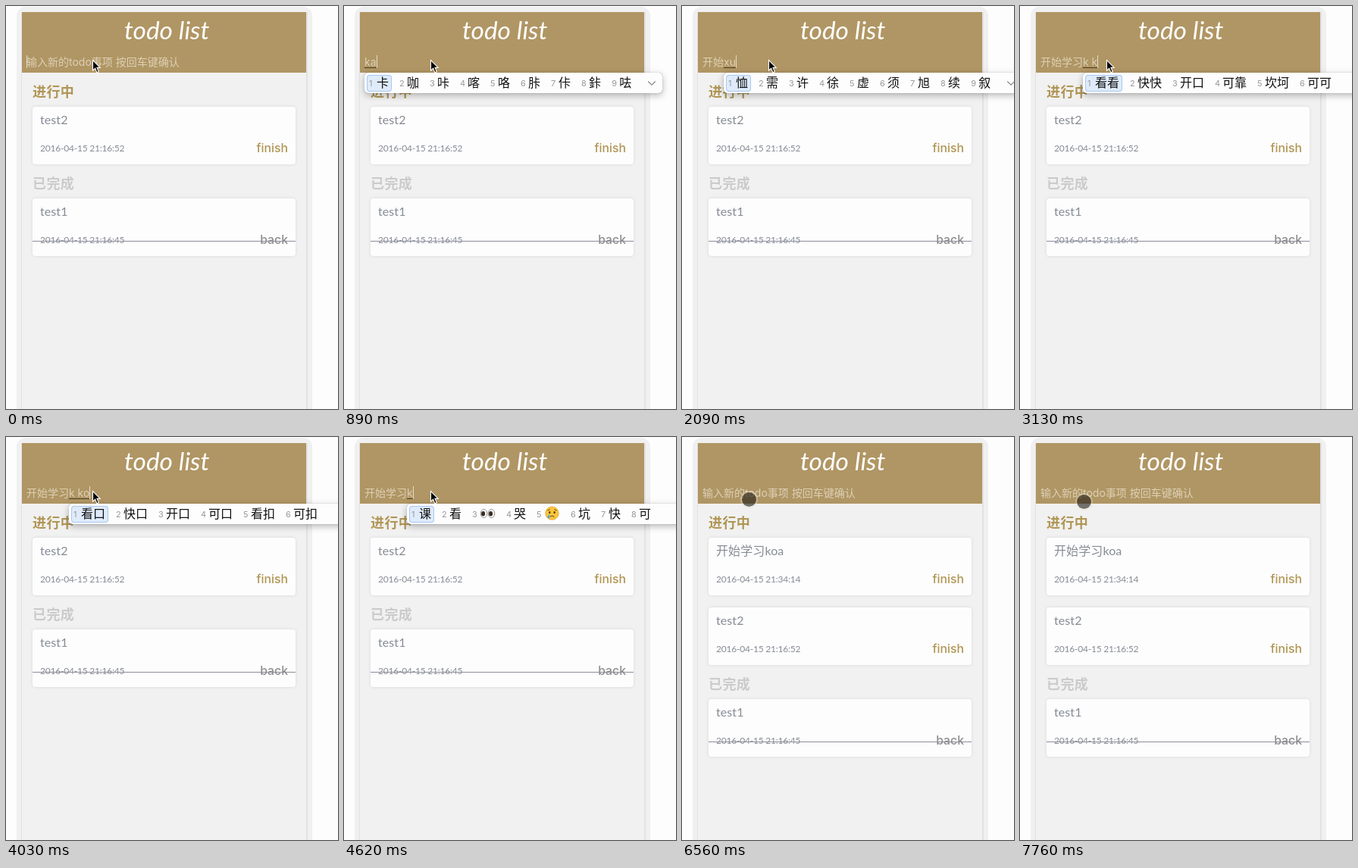
Write an HTML page that moves like this. It is 438 px wide and 532 px high and loops after 8000 ms.

```html
<!DOCTYPE html>
<html lang="zh-CN">
<head>
<meta charset="utf-8">
<title>todo list</title>
<style>
  html, body { margin: 0; width: 100%; height: 100%; overflow: hidden; background: #fdfdfd; }
  body { position: relative; font-family: Inter, "Noto Sans CJK SC", "Noto Sans CJK", sans-serif; }
  body div, .at { position: absolute; box-sizing: border-box; white-space: pre; }
  #phone { left: 14px; top: 1px; width: 390px; height: 560px; border-radius: 12px; background: #f0f0f0; }
  #screen { left: 20px; top: 8px; width: 378px; height: 540px; background: #f1f1f1;
            border: solid #e2e2e2; border-width: 0 2px 0 1px; }
  #head { left: 21px; top: 8px; width: 375px; height: 80px; background: #b09664; }
  #title { left: 156px; top: 11px; font: italic 400 33.5px/40px Lato, sans-serif; color: #fff; }
  #field { left: 27px; top: 64px; font-size: 14px; line-height: 20px; color: #ddd0b6; }
  #typed { border-bottom: 1px solid #4a3c22; display: inline-block; height: 17px; }
  #caret { top: 65px; width: 1px; height: 17px; background: #e6dcc8; }
  .label { left: 35px; font-size: 18px; line-height: 26px; font-weight: 700; letter-spacing: .4px; }
  .card { left: 35px; width: 347px; height: 76px; border-radius: 4px; background: #fdfdfd;
          box-shadow: 0 0 4px rgba(0,0,0,.1); color: #868b94; }
  .name { left: 10px; top: 5px; font: 400 16px/24px Lato, "Noto Sans CJK SC", "Noto Sans CJK", sans-serif; letter-spacing: .1px; }
  .date { left: 10px; top: 46px; font: 400 12px/18px Lato, sans-serif; letter-spacing: -.22px; }
  .act { right: 10px; top: 45px; font-size: 15.8px; line-height: 20px; font-weight: 500; color: #b09654; }
  .done .act { color: #8e8e8e; }
  .done::after { content: ""; position: absolute; left: 0; top: 56px; width: 100%; height: 1px; background: #8c8c9c; }
  #pop { top: 88px; width: 393px; height: 27px; padding: 3px 0 0 3px; display: flex; background: #fdfdfd;
         border-radius: 5px; box-shadow: 0 0 1px rgba(0,0,0,.45), 0 3px 10px rgba(0,0,0,.28); }
  #pop span { box-sizing: border-box; height: 22px; margin-right: 7px; padding: 0 4px 0 3px; display: flex;
              border-radius: 4px; font-size: 16px; line-height: 21px; color: #111; flex: none; }
  #pop span:first-child { background: #dfebfb; box-shadow: inset 0 0 0 1px #a8c8f0; }
  #pop i { width: 10px; font: 400 11px/22px Inter, sans-serif; color: #999; }
  #pop svg.face { width: 21px; height: 20px; }
  #pop svg.more { position: absolute; right: 8px; top: 10px; }
  #dot { width: 23px; height: 23px; border-radius: 50%; background: rgba(30,25,20,.6); background-clip: padding-box;
         border: 2px solid rgba(235,228,210,.4); }
</style>
</head>
<body>
<div id="phone"></div>
<div id="screen"></div>
<div id="head"></div>
<div id="title">todo list</div>
<div id="field"><span id="fixed"></span><span id="typed"></span></div>
<div id="caret"></div>
<div class="label" style="top:101px;color:#b09654">进行中</div>
<div id="fresh" class="card" style="top:133px">
  <div class="name">开始学习koa</div><div class="date">2016-04-15 21:34:14</div><div class="act">finish</div>
</div>
<div id="rest" style="left:0;top:0">
  <div class="card" style="top:133px">
    <div class="name">test2</div><div class="date">2016-04-15 21:16:52</div><div class="act">finish</div>
  </div>
  <div class="label" style="top:222px;color:#cbcbcb">已完成</div>
  <div class="card done" style="top:254px">
    <div class="name">test1</div><div class="date">2016-04-15 21:16:45</div><div class="act">back</div>
  </div>
</div>
<div id="pop"></div>
<svg id="arrow" class="at" style="left:113px;top:70px" width="14" height="20" viewBox="0 0 14 20">
  <path d="M1.5 1.5V15.2L4.6 12.3L6.9 17.7L9.3 16.7L7 11.4H11.2Z" fill="#000" stroke="#fff" stroke-width="1.1"/>
</svg>
<div id="dot"></div>
<script>
const LOOP = 8000;
const HINT = "输入新的todo事项 按回车键确认";
const $ = id => document.getElementById(id);

const EYES = `<svg class="face" viewBox="0 0 21 20"><g fill="#fff" stroke="#777" stroke-width=".8">
  <ellipse cx="5.5" cy="10" rx="4.3" ry="5.6"/><ellipse cx="15.5" cy="10" rx="4.3" ry="5.6"/></g>
  <g fill="#3a2a20"><ellipse cx="4.6" cy="10.2" rx="2.5" ry="3.3"/><ellipse cx="14.6" cy="10.2" rx="2.5" ry="3.3"/></g></svg>`;
const CRY = `<svg class="face" viewBox="0 0 21 20"><circle cx="10.5" cy="9.6" r="8.7" fill="#fbc63c" stroke="#e09a20" stroke-width=".7"/>
  <g fill="#5c3a10"><ellipse cx="7.3" cy="8.6" rx="1.2" ry="1.7"/><ellipse cx="13.7" cy="8.6" rx="1.2" ry="1.7"/></g>
  <path d="M7.5 14.7Q10.5 11.6 13.5 14.7M4.5 6L7.5 4.6M13.5 4.6L16.5 6" fill="none" stroke="#5c3a10"/>
  <path d="M6.3 10.8Q3 15 5.6 16.6Q8.4 16 6.3 10.8" fill="#4aa8ee"/></svg>`;
const MORE = `<svg class="more" width="12" height="8" viewBox="0 0 12 8"><path d="M1.2 1.5L6 6.2L10.8 1.5" fill="none" stroke="#888" stroke-width="1.2"/></svg>`;

const WORDS = {
  "ka": "卡 咖 咔 喀 咯 胩 佧 鉲 呿",
  "kai": "开 凯 楷 慨 揩 铠 锴 恺 忾",
  "kai s": "开始 开水 开设 开锁 开山 开所",
  "kai shi": "开始 开市 开释 开 凯 楷 慨",
  "x": "想 下 小 新 向 写 像 先 西",
  "xu": "恤 需 许 徐 虚 须 旭 续 叙",
  "xue x": "学习 学校 血型 学些 血腥 学下",
  "xue xi": "学习 血洗 学系 血吸 学 雪 血",
  "k": "课 看 :eyes 哭 :cry 坑 快 可",
  "k k": "看看 快快 开口 可靠 坎坷 可可",
  "k ko": "看口 快口 开口 可口 看扣 可扣",
  "k ko a": "看口啊 快口啊 开口啊 可口啊 看扣啊",
  "ko": "口 扣 靠 考 可 科 空 控 抠",
  "koa": "koa 靠啊 考啊 可爱 口啊 看啊"
};

// time, committed text, text being composed, caret shown
const STEPS = [
  [0, "", "", 1], [150, "", "", 0], [600, "", "", 1],
  [890, "", "ka", 1], [1040, "", "kai", 1], [1190, "", "kai s", 1], [1340, "", "kai shi", 1],
  [1490, "开始", "", 1], [1940, "开始", "x", 1], [2090, "开始", "xu", 1],
  [2240, "开始", "xue x", 1], [2390, "开始", "xue xi", 1], [2530, "开始学习", "", 1],
  [2980, "开始学习", "k", 1], [3130, "开始学习", "k k", 1],
  [3430, "开始学习", "k ko", 1], [3580, "开始学习", "k ko a", 1],
  [4030, "开始学习", "k ko", 1], [4180, "开始学习", "k k", 1], [4620, "开始学习", "k", 1],
  [5070, "开始学习", "ko", 1], [5220, "开始学习", "koa", 1], [5520, "开始学习koa", "", 1],
  [6110, "", "", 0], [7160, "", "", 1], [7760, "", "", 0]
];

// time, centre of the touch dot
const DOTS = [[5820, 116, 73], [6410, 106, 76], [6560, 88, 82], [6710, 70, 85], [6860, 84, 85]];
const ADDED = 6110;

const at = (table, t) => table.filter(row => row[0] <= t).pop();
const show = (el, on) => el.style.visibility = on ? "visible" : "hidden";

function item(word, i) {
  const body = word === ":eyes" ? EYES : word === ":cry" ? CRY : word;
  return `<span><i>${i + 1}</i>${body}</span>`;
}

let last;
function drawField(step) {
  if (step === last) return;
  last = step;
  const [, fixed, typed, caret] = step;
  const empty = !fixed && !typed;
  $("fixed").textContent = empty ? HINT : fixed;
  $("typed").textContent = typed;
  $("typed").style.display = typed ? "" : "none";
  const end = empty ? 27 : $("field").getBoundingClientRect().right;
  $("caret").style.left = Math.round(end) + "px";
  show($("caret"), caret);
  show($("pop"), typed);
  if (typed) {
    $("pop").style.left = 27 + fixed.length * 14 + "px";
    $("pop").innerHTML = WORDS[typed].split(" ").map(item).join("") + MORE;
  }
}

function draw(t) {
  drawField(at(STEPS, t));
  show($("fresh"), t >= ADDED);
  $("rest").style.top = t >= ADDED ? "92px" : "0";
  const dot = at(DOTS, t);
  show($("arrow"), !dot);
  show($("dot"), dot);
  if (dot) {
    $("dot").style.left = dot[1] - 11.5 + "px";
    $("dot").style.top = dot[2] - 11.5 + "px";
  }
}

const start = performance.now();
function tick() {
  draw((performance.now() - start) % LOOP);
  requestAnimationFrame(tick);
}
tick();
</script>
</body>
</html>
```
